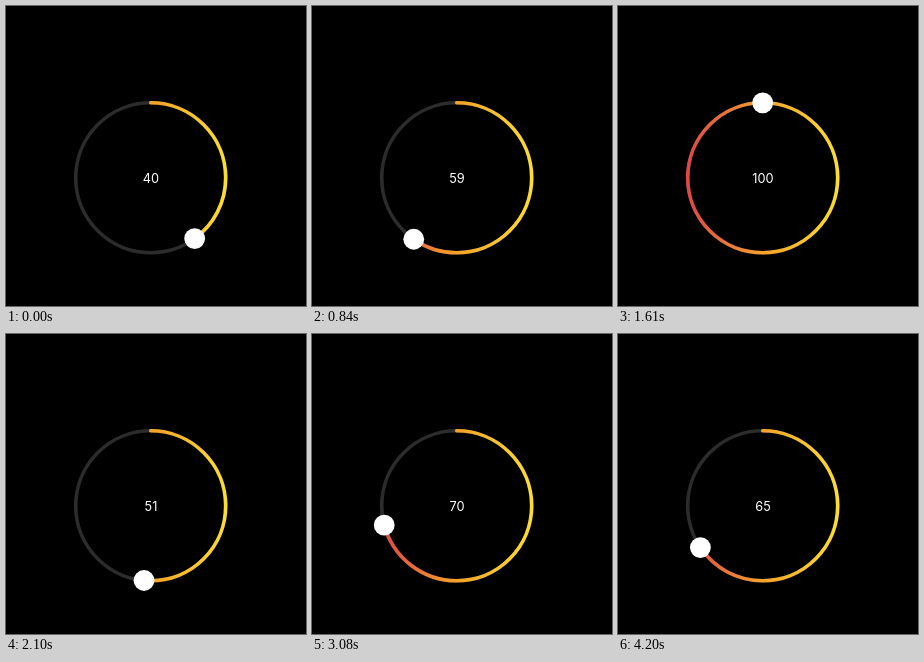
These frames come from a looping animation (300x300 px, 4970 ms). An HTML page with a canvas:

```html
<!DOCTYPE html>
<html lang="en">
<head>
<meta charset="utf-8">
<title>Circular slider</title>
<style>
  html, body { margin: 0; width: 100%; height: 100%; overflow: hidden; background: #000; }
  canvas { display: block; width: 300px; height: 300px; }
</style>
</head>
<body>
<canvas id="stage"></canvas>
<script>
const LOOP = 4970, STEP = 70, SIZE = 300;
const CX = 144.7, CY = 171.8, RADIUS = 75, LINE = 3.6, KNOB = 10.4;
const FIRST_VALUE = 40.03;

const accelerate = u => u ** 1.8;
const swing = bias => u => (1 - Math.cos(Math.PI * u ** bias)) / 2;

// Each drag starts at the value where the previous one ended.
const drags = [
  { start: 350, end: 1260, to: 100, ease: accelerate },
  { start: 1610, end: 2400, to: 37, ease: swing(0.8) },
  { start: 2400, end: 3360, to: 100, ease: accelerate },
  { start: 3850, end: 4200, to: 65.6, ease: swing(1.15) }
];

const canvas = document.getElementById('stage');
const ctx = canvas.getContext('2d');
const scale = window.devicePixelRatio || 1;
canvas.width = canvas.height = SIZE * scale;
ctx.scale(scale, scale);

const gradient = ctx.createLinearGradient(CX - RADIUS, 0, CX + RADIUS, 0);
gradient.addColorStop(0, '#e04646');
gradient.addColorStop(0.5, '#f5a22a');
gradient.addColorStop(1, '#fcdd30');

function valueAt(time) {
  let value = FIRST_VALUE;
  for (const { start, end, to, ease } of drags) {
    const u = Math.min(1, Math.max(0, (time - start) / (end - start)));
    value += (to - value) * ease(u);
  }
  return value;
}

function strokeArc(from, to, color) {
  ctx.beginPath();
  ctx.arc(CX, CY, RADIUS, from, to);
  ctx.strokeStyle = color;
  ctx.stroke();
}

function draw(value) {
  const top = -Math.PI / 2;
  const angle = top + value / 100 * Math.PI * 2;

  ctx.fillStyle = '#000';
  ctx.fillRect(0, 0, SIZE, SIZE);

  ctx.lineWidth = LINE;
  ctx.lineCap = 'round';
  strokeArc(0, Math.PI * 2, '#2c2c2c');
  strokeArc(top, angle, gradient);

  ctx.fillStyle = '#fff';
  ctx.beginPath();
  ctx.arc(CX + RADIUS * Math.cos(angle), CY + RADIUS * Math.sin(angle), KNOB, 0, Math.PI * 2);
  ctx.fill();

  ctx.font = '12.8px Inter, sans-serif';
  ctx.textAlign = 'center';
  ctx.fillText(Math.floor(value + 1e-6), 145, 176.7);
}

const start = performance.now();

function tick() {
  const time = (performance.now() - start) % LOOP;
  draw(valueAt(Math.floor(time / STEP) * STEP));
  requestAnimationFrame(tick);
}

tick();
</script>
</body>
</html>
```
